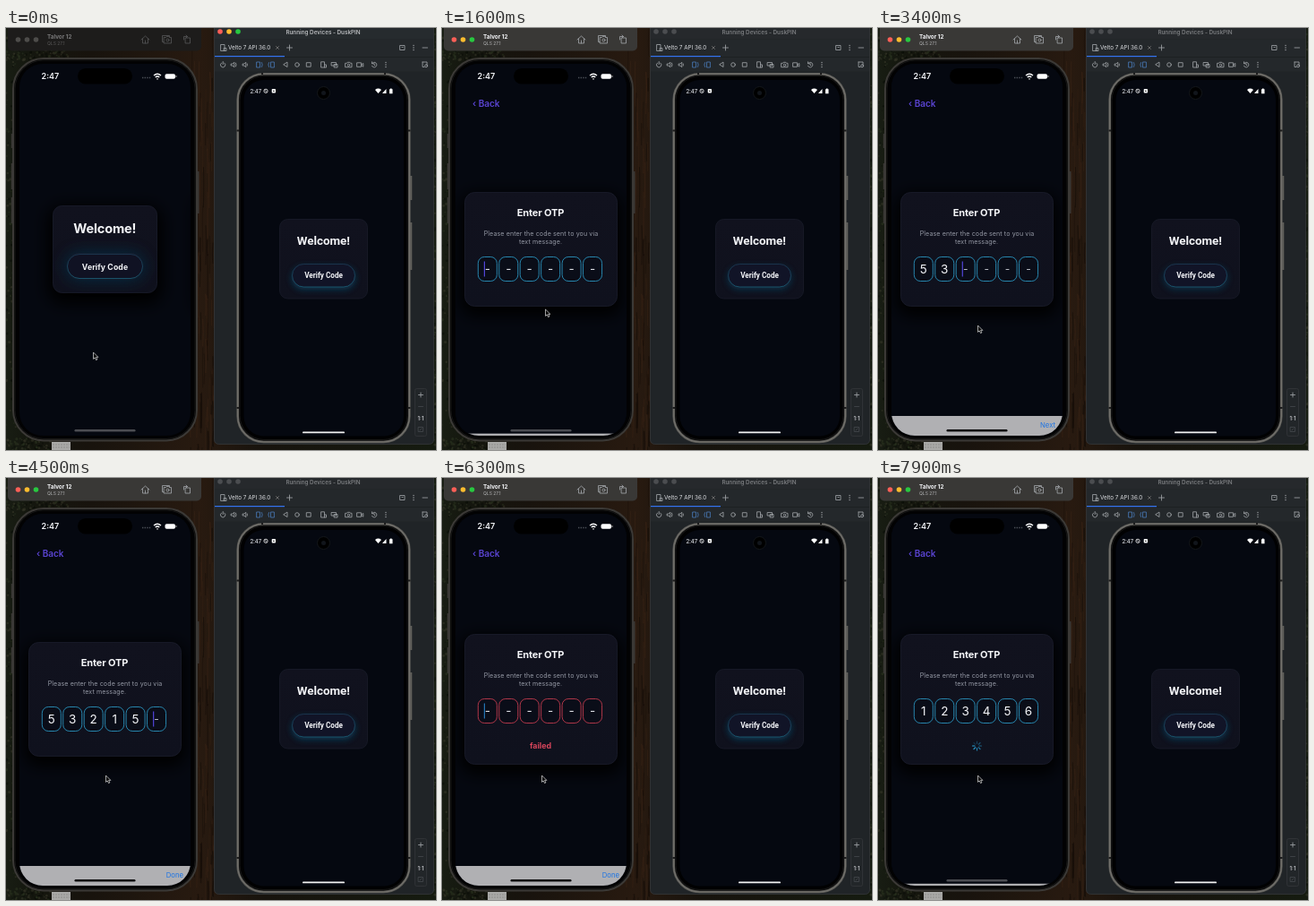
These frames come from a looping animation (480x471 px, 8 s). An HTML page:

```html
<!DOCTYPE html>
<html lang="en">
<head>
<meta charset="utf-8">
<style>
  html, body { margin: 0; width: 100%; height: 100%; overflow: hidden; background: #14100c; }
  svg { display: block; width: 480px; height: 471px; }
  text { font-family: Inter, sans-serif; fill: #f4f5f8; }
  .mid { text-anchor: middle; }
  .bold { font-weight: 700; }
  .semi { font-weight: 600; }
  .droid text { font-family: Roboto, sans-serif; }
  .icon { fill: none; stroke: #a4a7ab; stroke-width: .8; stroke-linecap: round; stroke-linejoin: round; }
</style>
</head>
<body>
<svg viewBox="0 0 480 471">
  <defs>
    <linearGradient id="forest">
      <stop offset="0" stop-color="#181d13"/><stop offset=".06" stop-color="#14160e"/>
      <stop offset=".2" stop-color="#18130d"/><stop offset=".45" stop-color="#281a10"/>
      <stop offset=".6" stop-color="#17130d"/><stop offset="1" stop-color="#151b10"/>
    </linearGradient>
    <linearGradient id="cardFill" x1="0" y1="0" x2="0" y2="1">
      <stop offset="0" stop-color="#11121e"/><stop offset="1" stop-color="#0f111d"/>
    </linearGradient>
    <linearGradient id="rim" x1="0" y1="0" x2="0" y2="1">
      <stop offset="0" stop-color="#1d3a55"/><stop offset="1" stop-color="#1b6078"/>
    </linearGradient>
    <filter id="blur" x="-50%" y="-80%" width="200%" height="260%"><feGaussianBlur stdDeviation="8.500"/></filter>
    <filter id="soft" x="-50%" y="-80%" width="200%" height="260%"><feGaussianBlur stdDeviation="3.500"/></filter>
    <clipPath id="screen"><rect x="15" y="40" width="191" height="415" rx="26"/></clipPath>
  </defs>

  <rect width="480" height="471" fill="url(#forest)"/>
  <g id="bark"></g>
  <path d="M51 462h21v9h-21z" fill="#a9a9a7"/>
  <path d="M52 465h19M52 468h19" stroke="#83837f" stroke-width=".7" stroke-dasharray="2 1"/>

  <!-- left simulator -->
  <rect id="simBar" x="2" y="-6" width="216" height="31.500" rx="5"/>
  <g id="simLights"><circle cx="13.500" cy="13" r="2.800"/><circle cx="23.500" cy="13" r="2.800"/><circle cx="33.500" cy="13" r="2.800"/></g>
  <g id="simHead">
    <text x="46" y="12" font-size="6.300" class="bold">Talvor 12</text>
    <text x="46" y="18.700" font-size="5" opacity=".65">QLS 27.1</text>
    <g class="icon">
      <path d="M151 13l4.500-4 4.500 4M152.500 12v5h6v-5M155.500 17v-3"/>
      <path d="M176 15.500h-1.500v-7h8v1.500M176.500 10.500h2l.8-1h2.400l.8 1h2v6.500h-8z"/><circle cx="180.500" cy="13.500" r="1.500"/>
      <path d="M200.500 11h5v6h-5zM198.500 13v-3.500h4M201 8l1.500 1.500-1.500 1.500"/>
    </g>
  </g>

  <path d="M214.500 160v47M6.800 118v16M6.800 151v29M6.800 189v29" stroke="#393734" stroke-width="2"/>
  <rect x="8" y="34" width="205" height="426.500" rx="34" fill="#0a0a0b" stroke="#3b3936" stroke-width="2"/>
  <rect x="10" y="36" width="201" height="422.500" rx="32" fill="#020203" stroke="#161615"/>
  <g clip-path="url(#screen)">
    <rect x="15" y="40" width="191" height="415" fill="#050810"/>
    <g id="home">
      <rect x="46" y="198" width="129" height="110" rx="18" fill="#020306" filter="url(#blur)"/>
      <rect x="52.500" y="198.500" width="116" height="97" rx="10" fill="url(#cardFill)" stroke="#1b1e2d" stroke-width=".8"/>
      <text x="110.300" y="229.200" font-size="14.600" letter-spacing="-.2" class="mid bold">Welcome!</text>
      <rect id="glowA" x="67" y="251" width="87" height="30" rx="15" fill="#0d3450" filter="url(#blur)"/>
      <rect x="68.500" y="252.500" width="84" height="27" rx="13.500" fill="#101223" stroke="url(#rim)" stroke-width=".8"/>
      <text x="110.500" y="269.500" font-size="8.700" letter-spacing=".1" class="mid bold">Verify Code</text>
    </g>
    <g id="otp">
      <rect x="15" y="40" width="191" height="415" fill="#050810"/>
      <text x="34" y="88" font-size="10" class="semi" style="fill:#5a44d2">‹ Back</text>
      <rect id="cardShade" x="20" width="181" rx="18" fill="#020306" filter="url(#blur)"/>
      <rect id="card" x="25.500" width="170" rx="11" fill="url(#cardFill)" stroke="#1b1e2d" stroke-width=".8"/>
      <g id="form">
        <text x="110" y="210.200" font-size="11" letter-spacing="-.15" class="mid bold">Enter OTP</text>
        <g class="mid" font-size="7.100" letter-spacing=".1">
          <text x="110.500" y="232" style="fill:#9498a4">Please enter the code sent to you via</text>
          <text x="110" y="241" style="fill:#9498a4">text message.</text>
        </g>
        <g id="cells"></g>
        <rect id="caret" y="260.500" width="1.200" height="17"/>
      </g>
      <text id="failed" x="110" y="302" font-size="8.900" class="mid bold" style="fill:#d6455b">failed</text>
      <g id="spinner"></g>
    </g>
    <g id="bar">
      <rect x="15" width="191" height="30" fill="#b0b0b3"/>
      <text id="action" x="198" y="13.200" font-size="7.700" text-anchor="end" style="fill:#1c74e4"></text>
    </g>
  </g>
  <rect id="homeLine" x="76.500" y="448" width="68" height="2.400" rx="1.200"/>
  <rect x="80" y="45" width="61" height="17.500" rx="8.750" fill="#000"/>
  <text x="49.400" y="57.300" font-size="9" class="mid semi">2:47</text>
  <path d="M152 55.500h9.500" stroke="#4c4f57" stroke-width="1.300" stroke-dasharray="1.400 1.200"/>
  <g fill="none" stroke="#fff" stroke-width="1.300"><path d="M165 53q4-3.600 8 0M166.700 55q2.300-2 4.600 0"/><path d="M168.300 56.800h1.400"/></g>
  <rect x="177.500" y="51.200" width="11.500" height="5.600" rx="1.800" fill="#fff"/><path d="M190 53v2" stroke="#aaa"/>

  <!-- right device window -->
  <rect x="232.500" y="-8" width="245" height="472.500" rx="5" fill="#202427" stroke="#35383a" stroke-width=".8"/>
  <path id="winBar" d="M233 0h244v12.500h-244z"/>
  <path d="M233 12.500h244v36h-244z" fill="#24282b"/>
  <g id="winLights"><circle cx="239" cy="4" r="2.800"/><circle cx="249" cy="4" r="2.800"/><circle cx="259" cy="4" r="2.800"/></g>
  <text id="winTitle" x="354" y="6.500" font-size="6.300" class="mid semi">Running Devices - DuskPIN</text>
  <path d="M233 32.500h244" stroke="#1a1b1d" stroke-width=".6"/>
  <path d="M233 31.700h78" stroke="#3574f0" stroke-width="1.300"/>
  <text x="248" y="24.300" font-size="6.300" style="fill:#dcdee2">Velto 7 API 36.0</text>
  <g class="icon">
    <path d="M240 18.500h4v7h-4zM243.500 22.500h2.500v3h-2.500z"/>
    <path d="M301.500 20.500l3 3m0-3l-3 3" stroke="#777"/>
    <path d="M313.500 22h6m-3-3v6M440 19.500h5v5h-5zM442 21.500h1M465 22h5.500"/>
    <path d="M455 19.500v.1m0 2.400v.1m0 2.400v.1M424 38.500v.1m0 2.400v.1m0 2.400v.1" stroke-width="1.300"/>
    <path d="M240.500 39a2.700 2.700 0 1 0 3.300 0M242.200 37.500v3"/>
    <path d="M251.500 40h1.300l2-1.700v5.400l-2-1.700h-1.300zM256.500 39q1.200 2 0 4M264.500 40h1.300l2-1.700v5.400l-2-1.700h-1.300zM269.300 40v2"/>
    <path d="M280 38h3.500v6h-3.500zM285.500 38.500q1.500 2.500 0 5M299 38h-3.500v6h3.500zM293.500 38.500q-1.500 2.500 0 5" stroke="#4a7cba"/>
    <path d="M314 38.500v5l-4-2.500z"/><circle cx="325" cy="41" r="2.300"/><path d="M335.700 38.700h4.500v4.500h-4.500z"/>
    <path d="M352 37.800h3.500v6.200h-3.500zM355.500 41h2v3h-2M363.500 38.500h5v3.500h-5zM366.500 40.500h3.500v3.500h-3.500z"/>
    <path d="M379 39.300h1.500l.7-1h2.600l.7 1h1.500v4.400h-7z"/><circle cx="382.500" cy="41.400" r="1.200"/>
    <path d="M392 38.800h4.500v4.500h-4.500zM396.500 41l2.300-1.500v3.300z"/>
    <path d="M408.700 39.500a2.800 2.800 0 1 1-.2 2.800M408.500 37.800v2h2M411 39.800v1.400l1 .6"/>
    <path d="M465 38h5v3.500M465 38v5.500h2"/><circle cx="469" cy="42.300" r="1.500"/>
  </g>

  <path d="M452 165v27M452 217v53" stroke="#5f5e5a" stroke-width="2.500"/>
  <rect x="258.700" y="51.200" width="191.600" height="410.800" rx="29" fill="#0b0b0c" stroke="#5d5c58" stroke-width="2.600"/>
  <rect x="258.700" y="51.200" width="191.600" height="410.800" rx="29" fill="none" stroke="#7c7a75" stroke-width=".8"/>
  <rect x="261" y="53.500" width="187" height="406" rx="27" fill="#010102" stroke="#1b1b1a" stroke-width=".8"/>
  <path d="M257.500 114.500h2.500M257.500 424h2.500M449 114.500h2.500M449 424h2.500M285 51h2M422 51h2" stroke="#1c1c1c" stroke-width="2"/>
  <rect x="265.500" y="58" width="178.500" height="397.500" rx="22" fill="#050810"/>
  <circle cx="354.500" cy="72.500" r="7" fill="#000" stroke="#14171b"/><circle cx="354.500" cy="72.500" r="2.500" fill="#11151b"/>
  <g class="droid">
    <text x="272.500" y="72.700" font-size="6.600">2:47</text>
    <circle cx="290" cy="70.300" r="2.100" fill="none" stroke="#fff" stroke-width=".8"/><path d="M288.500 69l3 2.800" stroke="#fff" stroke-width=".7"/>
    <rect x="296.700" y="68" width="4.300" height="4.600" rx=".8" fill="#fff"/><path d="M298 70.300h1.700" stroke="#111"/>
    <path d="M412 69q3.500-2.800 7 0l-3.500 4zM420 73h4.500v-5zM428 68.300h3.500v5h-3.500zM429 67.500h1.500v1h-1.500z" fill="#fff"/>
    <rect x="305.500" y="213.500" width="98" height="88.500" rx="9" fill="url(#cardFill)" stroke="#1a1c2a" stroke-width=".8"/>
    <text x="354.300" y="242" font-size="13.400" class="mid bold">Welcome!</text>
    <rect id="glowB" x="319" y="266" width="71" height="26" rx="13" fill="#0e3f5c" filter="url(#soft)"/>
    <rect x="319.500" y="263.500" width="70" height="25.500" rx="12.750" fill="#111427" stroke="url(#rim)" stroke-width=".8"/>
    <text x="354.600" y="278.900" font-size="8.200" class="mid bold">Verify Code</text>
  </g>
  <rect x="331" y="450.500" width="47" height="1.800" rx=".9" fill="#f2f2f2"/>
  <rect x="456.500" y="402.500" width="13" height="53" rx="2" fill="#222629" stroke="#34373a" stroke-width=".8"/>
  <g class="icon"><path d="M460.500 409.500h5m-2.500-2.500v5"/><path d="M460.500 422.500h5M460.500 445.500h5v5h-5zM462 449l2-2" stroke="#44484d"/></g>
  <text x="463" y="437.600" font-size="5.800" class="mid semi" style="fill:#c4c7cb">1:1</text>

  <path id="cursor" d="M0 0v7.400l1.700-1.500 1.300 2.700 1.400-.6-1.300-2.600h2.300z" fill="#080808" stroke="#e4e4e4" stroke-width=".7"/>
</svg>
<script>
const $ = id => document.getElementById(id);
const set = (id, attrs) => { for (const k in attrs) $(id).setAttribute(k, attrs[k]); };
const show = (id, on) => set(id, { opacity: +on });
const ramp = (t, start, length) => Math.min(1, Math.max(0, (t - start) / length));
const smooth = x => x * x * (3 - 2 * x);
const LOOP = 8000, ACTIVE = 1050, PUSH = 1120, FOCUS = 1540, FAIL = 6000;
const tries = [
  { code: '532158', keys: [2700, 3150, 3650, 4000, 4350, 4700] },
  { code: '123456', keys: [6600, 6810, 7020, 7230, 7440, 7640] }
];
const path = [[0, 97.5, 362], [300, 97.5, 362], [800, 97, 266.5], [1150, 97, 266.5], [1600, 115.5, 314], [2100, 111.5, 332], [LOOP, 111.5, 332]];

// Wallpaper: seeded bark streaks and leaf specks
let seed = 7;
const rand = () => (seed = seed * 16807 % 2147483647) / 2147483647;
let bark = '';
for (let i = 0; i < 110; i++) {
  const x = 206 + rand() * 27, y = rand() * 471;
  bark += `<path d="M${x} ${y}q${rand() * 3 - 1.5} 15 0 ${15 + rand() * 40}" stroke="${i % 2 ? '#0f0a06' : '#3a2415'}" stroke-width="${.5 + rand()}" opacity=".5" fill="none"/>`;
}
const leaves = (count, x, y, w, h) => {
  for (let i = 0; i < count; i++) {
    const color = ['#2c3520', '#090c07', '#38392a'][i % 3];
    bark += `<circle cx="${x + rand() * w}" cy="${y + rand() * h}" r="${.5 + rand() * 1.2}" fill="${color}" opacity=".55"/>`;
  }
};
leaves(130, 0, 0, 12, 471);
leaves(70, 0, 458, 50, 13);
leaves(70, 0, 25, 70, 11);
leaves(90, 477, 0, 3, 471);
$('bark').innerHTML = bark;

$('cells').innerHTML = [...'000000'].map((_, i) => {
  const x = 40.3 + i * 23.45;
  return `<rect x="${x}" y="255.500" width="21" height="27" rx="7" fill="#0a0d18" stroke-width=".9"/>
    <text x="${x + 10.5}" class="mid"></text>`;
}).join('');
const cells = [...$('cells').querySelectorAll('rect')];
const digits = [...$('cells').querySelectorAll('text')];

$('spinner').innerHTML = [...'00000000'].map((_, i) =>
  `<path d="M0-2.500v-2.500" stroke="#2aa5dc" stroke-width="1.200" stroke-linecap="round" opacity="${.2 + i * .11}" transform="rotate(${i * 45})"/>`).join('');

function windows(left) {
  const lights = ['#ff5f57', '#febc2e', '#28c840'];
  const paint = (id, on, off) => [...$(id).children].forEach((c, i) => c.setAttribute('fill', on ? lights[i] : off));
  paint('simLights', left, '#4d4c4a');
  paint('winLights', !left, '#4b4d50');
  set('simBar', { fill: left ? '#393836' : '#1d1c1b' });
  set('simHead', { opacity: left ? 1 : .42 });
  set('winBar', { fill: left ? '#26292c' : '#262b2e' });
  set('winTitle', { opacity: left ? .4 : .7 });
}

function pointer(t) {
  const i = path.findIndex(p => p[0] > t);
  const [t0, x0, y0] = path[i - 1], [t1, x1, y1] = path[i];
  const k = smooth(ramp(t, t0, t1 - t0));
  set('cursor', { transform: `translate(${x0 + (x1 - x0) * k} ${y0 + (y1 - y0) * k})` });
}

function form(t) {
  const { code, keys } = tries[+(t >= FAIL)];
  const typed = keys.filter(k => k <= t).length;
  const busy = typed === 6, failed = t >= FAIL && !busy, tall = t >= tries[0].keys[5];
  const top = tall ? 174.5 : 183.5, height = tall ? 145 : 127;
  set('card', { y: top, height });
  set('cardShade', { y: top + 1, height: height + 10 });
  set('form', { transform: `translate(0 ${tall ? -9 : 0})` });
  cells.forEach((c, i) => {
    c.setAttribute('stroke', failed ? '#c23c4e' : '#2b93be');
    const d = digits[i], filled = i < typed;
    d.textContent = filled ? code[i] : typed ? '-' : '–';
    d.setAttribute('y', filled ? 273.8 : typed ? 272.6 : 272);
    d.setAttribute('font-size', filled ? 13.5 : typed ? 12 : 8.5);
    d.setAttribute('font-weight', filled || typed ? 400 : 800);
    d.style.fill = filled ? '#f4f5f8' : typed ? '#b9bcc5' : '#dcdee4';
  });
  const since = t - (typed ? keys[typed - 1] : t >= FAIL ? FAIL : FOCUS);
  set('caret', { x: 46.8 + typed * 23.45, fill: failed ? '#2374b4' : '#5145d8', opacity: !busy && t >= FOCUS && since % 1000 < 600 ? 1 : 0 });
  show('failed', failed);
  show('spinner', busy);
  set('spinner', { transform: `translate(110.500 299) rotate(${Math.floor(t / 100) * 45})` });
  const start = keys[5] + 20;
  const lift = busy ? 1 - smooth(ramp(t, start, 300)) : smooth(ramp(t, t >= FAIL ? FAIL : FOCUS, 300));
  set('bar', { transform: `translate(0 ${455 - 22 * lift})` });
  $('action').textContent = typed > 4 || (t >= FAIL && !typed) ? 'Done' : 'Next';
  set('homeLine', { fill: lift > .4 ? '#101012' : '#4b4d52' });
}

function draw(now) {
  const t = now % LOOP;
  windows(t >= ACTIVE);
  pointer(t);
  const push = 1 - (1 - ramp(t, PUSH, 430)) ** 4;
  set('home', { transform: `translate(${-57 * push} 0)` });
  set('otp', { transform: `translate(${191 * (1 - push)} 0)` });
  form(t);
  const pulse = .5 + .5 * Math.sin(t * Math.PI / 1000 + .6);
  set('glowA', { opacity: .6 + .15 * pulse });
  set('glowB', { opacity: .6 + .25 * pulse });
  requestAnimationFrame(() => draw(performance.now()));
}
draw(performance.now());
</script>
</body>
</html>
```
